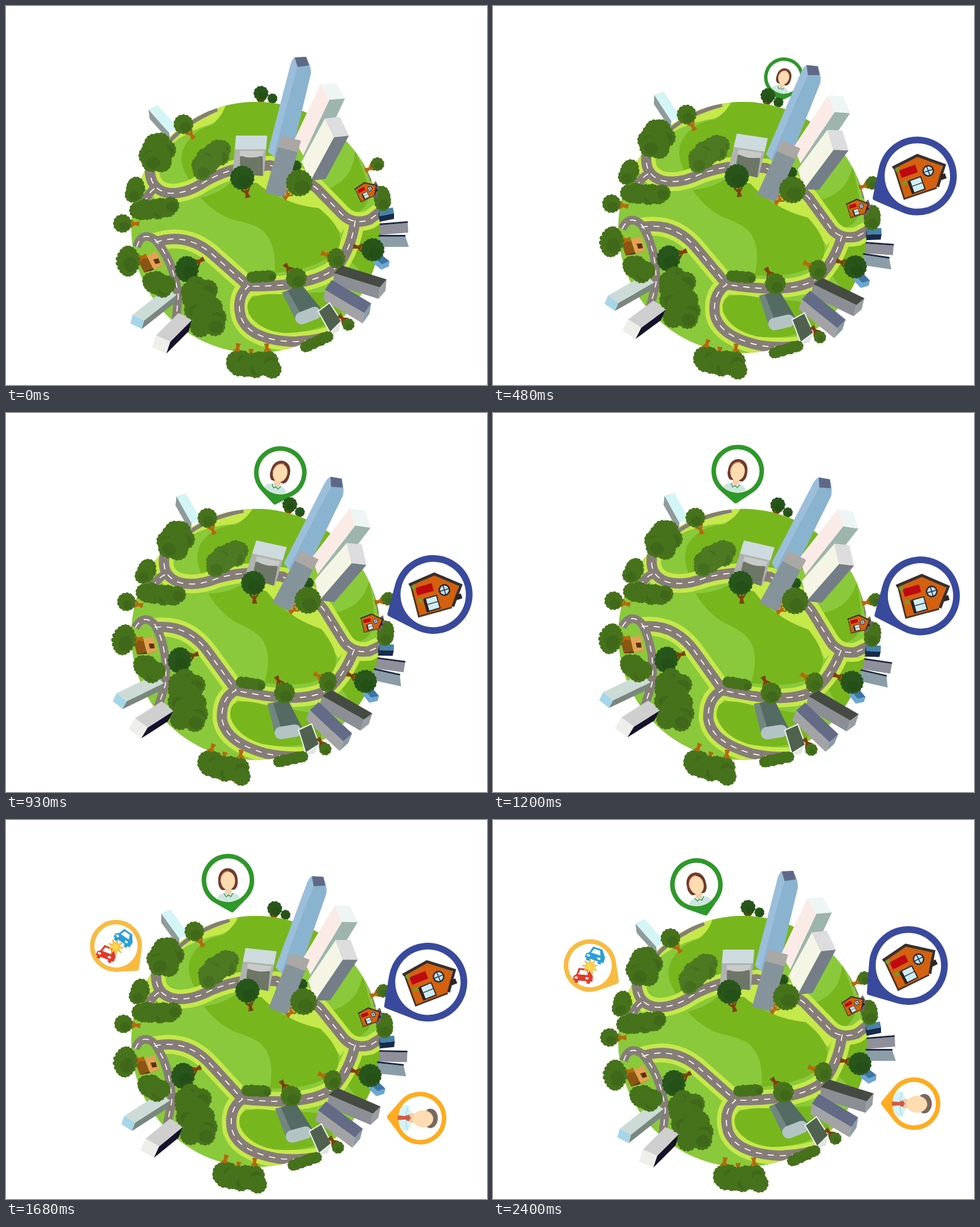
These frames come from a looping animation (843x664 px, 3.6 s). An HTML page:

```html
<!DOCTYPE html>
<html lang="en">
<head>
<meta charset="utf-8">
<title>Little planet with map pins</title>
<style>
html, body { margin: 0; width: 100%; height: 100%; overflow: hidden; background: #fff; }
svg { display: block; width: 843px; height: 664px; }
</style>
</head>
<body>
<svg id="stage" viewBox="0 0 843 664" xmlns="http://www.w3.org/2000/svg"></svg>
<script>
const CX = 438, CY = 388;
const LEAF = ['#47721c', '#3f681a'], DARK = ['#28561a', '#245018'], OLIVE = ['#4d7922', '#456f1f'];
const BARK = '#b5690f', BROWN = '#7d400c', SKIN = '#fddcb1';
const GRASS = '#8ac93b', MEADOW = '#78b61e', LIME = '#c5e84a', ROAD = '#867d78';

const path = (d, fill, extra = '') => `<path d="${d}" fill="${fill}" ${extra}/>`;
const line = (d, color, w, extra = '') => path(d, 'none', `stroke="${color}" stroke-width="${w}" ${extra}`);
const poly = (pts, fill, extra = '') => `<polygon points="${pts}" fill="${fill}" ${extra}/>`;
const oval = (x, y, rx, ry, fill, extra = '') =>
  `<ellipse cx="${x}" cy="${y}" rx="${rx}" ry="${ry}" fill="${fill}" ${extra}/>`;
const rect = (x, y, w, h, fill, extra = '') =>
  `<rect x="${x}" y="${y}" width="${w}" height="${h}" fill="${fill}" ${extra}/>`;
const place = (x, y, turn, inner, scale = 1) =>
  `<g transform="translate(${x} ${y}) rotate(${turn}) scale(${scale})">${inner}</g>`;

// Three visible faces that meet in one corner, spanned by the edges u, v and w.
function prism(x, y, u, v, w, uv, vw, uw) {
  const face = ([a, b], [c, d], fill) =>
    poly([x, y, x + a, y + b, x + a + c, y + b + d, x + c, y + d].join(' '), fill);
  return face(v, w, vw) + face(u, w, uw) + face(u, v, uv);
}

function crown(x, y, rx, ry, fill) {
  const n = Math.max(9, Math.round((rx + ry) * .42)), r = Math.PI * (rx + ry) / n * .56;
  let d = '';
  for (let i = 0; i <= n; i++) {
    const q = i / n * Math.PI * 2;
    d += (i ? `A${r} ${r} 0 0 1 ` : 'M') + `${x + (rx - 1) * Math.cos(q)} ${y + (ry - 1) * Math.sin(q)}`;
  }
  return path(d + 'Z', fill);
}
const bush = (x, y, r, [light, shade] = LEAF, tall = 1) =>
  crown(x, y, r, r * tall, light) + crown(x + r * .2, y + r * .3, r * .6, r * .5 * tall, shade);

// Trunks point to the middle of the planet.
function tree(x, y, r, tone = LEAF, bark = BARK, tall = 1) {
  const dx = CX - x, dy = CY - y, k = r * 1.3 / Math.hypot(dx, dy);
  const turn = Math.atan2(dy, dx) * 180 / Math.PI - 90;
  return place(x + dx * k, y + dy * k, turn,
    path('M-4 9L-2 1L-8 -6L-6 -8L-1 -4L0 -9L2 -4L7 -8L8 -6L3 1L5 9Z', bark)) + bush(x, y, r, tone, tall);
}

// A row of crowns that weave around a straight line.
function grove(x1, y1, x2, y2, r, weave, [light, shade] = LEAF) {
  const dx = x2 - x1, dy = y2 - y1, len = Math.hypot(dx, dy), n = Math.round(len / 9) + 4;
  let out = '';
  for (let i = 0; i <= n; i++) {
    const u = i / n, off = weave * Math.sin(i * 2.4) / len;
    const x = x1 + dx * u - dy * off, y = y1 + dy * u + dx * off;
    out += crown(x, y, r, r, light) + crown(x + 2, y + 2, r * .7, r * .6, i % 2 ? light : shade);
  }
  return out;
}

const house = () => place(0, 0, -27,
  poly('-35,29 -33,-29 12,-34 48,-3 25,31', '#d3610f') +
  line('M-33 -29L-35 30L25 31', '#4a3526', 3) +
  line('M-36 -28L12 -34L51 -2L27 30', '#35302f', 5) +
  rect(37, 12, 10, 9, '#2b2727') +
  rect(-27, -20, 30, 14, '#bd0a12') +
  oval(21, -2, 9, 9, '#bfe0ee', 'stroke="#222b33" stroke-width="2.5"') +
  line('M12 -2H30M21 -11V7', '#222b33', 1.5) +
  rect(-16, 3, 21, 23, '#d0edf3', 'stroke="#2a2a2e" stroke-width="2"') +
  line('M-17 3V27', '#25211f', 5) + line('M-16 14H5', '#31424a', 1.5) +
  oval(-29, -22, 4, 4, '#769b27') + oval(-25, 4, 4, 4, '#769b27'));

const avenues = [
  'M252 280Q250 324 288 328Q318 329 350 307Q377 292 408 284L462 279Q510 292 545 320L588 364Q608 385 638 374L660 357',
  'M612 376Q606 422 582 455Q545 492 425 491',
  'M262 414Q318 395 365 438L425 491Q402 510 412 546Q427 584 500 588Q545 588 590 570'
];
const lanes = ['M229 422Q238 393 262 410Q294 447 302 508L298 550', 'M260 320Q248 328 242 350'];
const strokes = (list, color, w, extra) => list.map(d => line(d, color, w, extra)).join('');

const land = () =>
  '<clipPath id="disc"><ellipse cx="438" cy="388" rx="218.5" ry="220"/></clipPath><g clip-path="url(#disc)">' +
  oval(CX, CY, 220, 221, GRASS) +
  path('M383 174Q430 155 535 178L505 240L460 265L385 280Q350 302 322 306Q297 270 315 242Q330 217 362 208Q373 200 383 174', MEADOW) +
  path('M385 174Q374 205 350 210Q310 224 286 246L270 250Q295 212 350 183Z', LIME) +
  path('M612 252Q610 305 560 322L605 368Q650 350 630 300Z', MEADOW) +
  path('M655 372Q626 382 621 402L605 448L636 480L665 420Z', MEADOW) +
  strokes(avenues, LIME, 33) +
  path('M410 310L455 285L540 305L600 375L588 398L548 356Q505 350 480 333Q450 318 410 322Z', LIME) +
  path('M341 336Q375 328 395 308L440 310Q483 347 548 354Q596 392 583 424Q560 452 510 462L471 468Q475 405 440 387Q425 380 400 375Q368 365 341 336', MEADOW) +
  path('M425 518Q432 503 480 505L590 500L588 540Q550 572 490 573Q445 570 426 540Q421 528 425 518', MEADOW) +
  line('M370 181Q315 205 286 238', ROAD, 7) + line('M610 246Q630 275 640 306', ROAD, 4) +
  strokes(lanes, ROAD, 15) + strokes(avenues, ROAD, 18) +
  strokes([...avenues, ...lanes], '#fff', 1.7, 'stroke-dasharray="11 10"') + '</g>';

const towers = () =>
  prism(250, 182, [16, -8], [36, 40], [2, 16], '#d3f5f6', '#8f9b9a', '#8f9b9a') +
  path('M497 109Q500 94 506 90L526 89Q537 110 534 120L507 232L470 265L459 255Z', '#9bbeda') +
  path('M511 107L531 104L534 118L507 232L469 265Q490 180 511 107', '#8ab3cf') +
  poly('506,90 526,89 531,104 511,107', '#5f6987') +
  prism(567, 164, [27, -2], [-16, -27], [-46, 98], '#edf6f4', '#fbebe7', '#9db5ad') +
  bush(508, 280, 10, DARK) +
  prism(575, 230, [26, -3], [-16, -33], [-41, 76], '#dddcdf', '#f5f5e6', '#747d88') +
  // arched hall
  prism(456, 251, [-55, 0], [2, -24], [-4, 46], '#cddbde', '#1b1830', '#afb2b0') +
  path('M410 294V264Q430 257 450 264V298Z', '#6d7667') +
  path('M410 254H452L450 262Q430 269 410 262Z', '#c7cac9') +
  prism(511, 256, [-34, -9], [6, -20], [-23, 80], '#aaa7a4', '#697176', '#85949a');

const suburbs = () =>
  prism(655, 368, [25, -5], [-2, -10], [0, 10], '#4783a8', '#182a4d', '#182a4d') +
  prism(655, 384, [49, -4], [0, -3], [1, 17], '#202842', '#8f909a', '#8f909a') +
  prism(653, 404, [47, 0], [0, -3], [6, 18], '#1b2944', '#8b9ea8', '#8b9ea8') +
  prism(659, 453, [-14, -11], [13, -6], [-1, 9], '#3d76a3', '#6aa6d2', '#6aa6d2') +
  prism(655, 493, [-80, -25], [12, -14], [-2, 20], '#454b43', '#999ea2', '#8b8e95') +
  prism(628, 538, [-69, -41], [12, -17], [-3, 18], '#646b87', '#889ba4', '#a3a3a6') +
  // round-ended hall and open box
  poly('484,502 518,488 552,530 508,550', '#546b63') +
  poly('484,502 493,498 520,545 508,550', '#718681') +
  line('M518 547L541 538', '#b4c4c5', 22, 'stroke-linecap="round"') +
  poly('568,572 588,552 583,570 566,576', '#e1e4e0') +
  poly('547,535 567,520 588,552 568,572', '#50624f', 'stroke="#eef4ec" stroke-width="2"') +
  prism(242, 551, [57, -45], [-20, -10], [-4, 15], '#cddbd6', '#a5d6ea', '#79877f') +
  prism(288, 588, [39, -39], [-25, -11], [-7, 21], '#cfcfcf', '#eeefeb', '#15122c') +
  prism(259, 462, [16, -8], [-12, -24], [-17, 5], '#e3a253', '#8b5513', '#54300b') +
  poly('258,444 267,442 270,450 262,452', '#58320b');

const woods = () =>
  tree(311, 207, 17) + grove(270, 240, 260, 274, 18, 13) + grove(378, 251, 339, 284, 16, 8, OLIVE) +
  tree(414, 301, 21, DARK, BROWN) + tree(514, 310, 23) +
  grove(228, 313, 225, 331, 14, 3) + grove(231, 358, 289, 353, 15, 4) +
  tree(204, 381, 16) + tree(214, 447, 19, LEAF, BARK, 1.45) + grove(255, 482, 280, 492, 16, 5) +
  tree(317, 461, 20, DARK, BROWN, 1.15) + grove(333, 491, 358, 563, 18, 17) +
  grove(431, 475, 464, 473, 10, 1) + tree(509, 477, 18, LEAF, BROWN) + tree(579, 442, 15, LEAF, BARK, 1.2) +
  tree(643, 427, 20, DARK, BROWN) + grove(658, 329, 661, 345, 14, 1) +
  tree(651, 277, 12) + tree(600, 558, 11, LEAF, BROWN) + grove(525, 597, 564, 579, 10, 1) +
  [403, 429, 460].map(x => tree(x, 622 + (x === 429) * 10, 17)).join('') + grove(402, 627, 467, 629, 16, 8);

const globe = () =>
  bush(467, 162, 9, DARK) + tree(447, 153, 13, DARK, BROWN) +
  land() + towers() + suburbs() + woods() +
  poly('640,316 648,307 654,318 650,336 641,334', '#6d6560') + place(630, 325, 0, house(), .43);

// Teardrop with a rounded tip and sides tangent to the round head.
function drop({ head: [x, y, radius], tip: [tx, ty], color }) {
  const soft = 4, r = radius - soft, dx = tx - x, dy = ty - y, len = Math.hypot(dx, dy) - soft;
  const way = Math.atan2(dy, dx), open = Math.acos(r / len);
  const at = (q, k) => `${x + k * Math.cos(q)} ${y + k * Math.sin(q)}`;
  return path(`M${at(way, len)}L${at(way + open, r)}A${r} ${r} 0 1 1 ${at(way - open, r)}Z`, color,
    `stroke="${color}" stroke-width="${soft * 2}" stroke-linejoin="round"`) + oval(x, y, radius * .83, radius * .83, '#fff');
}

// Pin pictures are drawn around the middle of the head.
const woman = () => place(0, 0, -12,
  path('M-17 0C-17 -28 17 -28 17 0Q18 12 11 17H-11Q-18 12 -17 0', '#6d3b29') +
  path('M-14 2Q-13 -17 3 -17L-6 12Z', '#c8624b') +
  path('M-20 32Q-18 24 -6 22L0 27L6 22Q18 24 20 32Q0 44 -20 32', '#cfe6dd') +
  poly('-5,12 5,12 6,22 0,27 -6,22', '#f6cfa4') + oval(0, 1, 12.5, 16, SKIN) +
  line('M-8 23L-4 29L0 26L4 29L8 23', '#2e8d62', 1.3));

const man = () =>
  path('M-35 -16Q-27 -25 -20 -21L-13 -4V6L-20 22Q-29 27 -35 17Q-40 0 -35 -16', '#d6f3f8') +
  rect(-19, -8, 14, 16, '#f4cda3') + oval(18, 0, 13, 17, '#786760') + oval(5, 1, 18, 15, SKIN) +
  line('M-22 -19L-25 -5L-16 0L-25 6L-22 21', '#a9dce8', 1.5) +
  poly('-39,-4 -26,-3 -20,-6 -16,0 -20,6 -26,3 -39,4', '#d45b42');

const car = (x, y, turn, color) => place(x, y, turn,
  path('M-17 2L-12 -2L-9 -13H8L17 -1V9H13V13H7V9H-8V13H-14V9H-17Z', color) +
  poly('-9,-2 -6,-10 5,-10 8,-2', '#fff') +
  oval(-12, 4, 3, 2, '#fff') + oval(7, 4, 3, 2, '#fff'));

function burst(points, outer, inner) {
  const pts = Array.from({ length: points * 2 }, (_, i) => {
    const q = i * Math.PI / points, r = i % 2 ? inner : outer;
    return `${r * Math.sin(q)},${-r * Math.cos(q)}`;
  });
  return poly(pts.join(' '), '#fbd84a', 'stroke="#f2a02c" stroke-width="1"');
}
const crash = () => car(10, -18, 18, '#2a9fd8') + car(-12, 18, 5, '#e03a2b') + place(0, 2, 0, burst(9, 14, 6));

const pins = [
  { head: [356.5, 113, 46], tip: [374, 167], color: '#2e9829', art: woman, start: 430, swing: .7, slide: 23.7 },
  { head: [728, 255, 69], tip: [656, 305], color: '#394a9d', art: house, start: 0, swing: -.15, slide: 0 },
  { head: [738, 497, 46], tip: [680, 496], color: '#feac20', art: man, start: 1200, swing: -.8, slide: 0 },
  { head: [170, 255, 46], tip: [220, 285], color: '#f8bb42', art: crash, start: 1440, swing: 1.85, slide: 0 }
];

const groups = pins.map((p, i) => `<g id="pin${i}">${drop(p)}${place(p.head[0], p.head[1], 0, p.art())}</g>`);
document.getElementById('stage').innerHTML =
  groups[0] + `<g id="globe">${globe()}</g>` + groups.slice(1).join('');
const globeNode = document.getElementById('globe');
const pinNodes = pins.map((p, i) => document.getElementById('pin' + i));

const clamp = u => Math.min(1, Math.max(0, u));
const smooth = u => u * u * (3 - 2 * u);
function bezier(u, x1, y1, x2, y2) {
  const mix = (s, a, b) => 3 * (1 - s) ** 2 * s * a + 3 * (1 - s) * s * s * b + s ** 3;
  let lo = 0, hi = 1;
  for (let i = 0; i < 24; i++) {
    const m = (lo + hi) / 2;
    if (mix(m, x1, x2) < u) lo = m; else hi = m;
  }
  return mix(lo, y1, y2);
}
const tilt = t => 12.9 * (t < 1200
  ? bezier(t / 1200, .25, .25, .36, 1)
  : 1 - bezier(clamp((t - 1200) / 1200), .33, 0, .34, 1));
const pop = t => t <= 0 ? 0 : 1 - Math.exp(-t / 70) * Math.cos(t * Math.PI / 150);

function draw(t) {
  const a = tilt(t), away = 1 - smooth(clamp((t - 780) / 300));
  globeNode.setAttribute('transform', `rotate(${a} ${CX} ${CY})`);
  pins.forEach((p, i) => {
    const size = pop(t - p.start), [x, y] = p.tip, shift = p.slide * away;
    pinNodes[i].setAttribute('display', size > 0 ? 'inline' : 'none');
    pinNodes[i].setAttribute('transform',
      `rotate(${a + shift} ${CX} ${CY}) translate(${x} ${y}) ` +
      `rotate(${p.swing * a - shift * .4}) scale(${size}) translate(${-x} ${-y})`);
  });
}

const begin = performance.now();
function tick() {
  const t = (performance.now() - begin) % 3600;
  draw(Math.floor(t / 30) * 30);
  requestAnimationFrame(tick);
}
tick();
</script>
</body>
</html>
```
